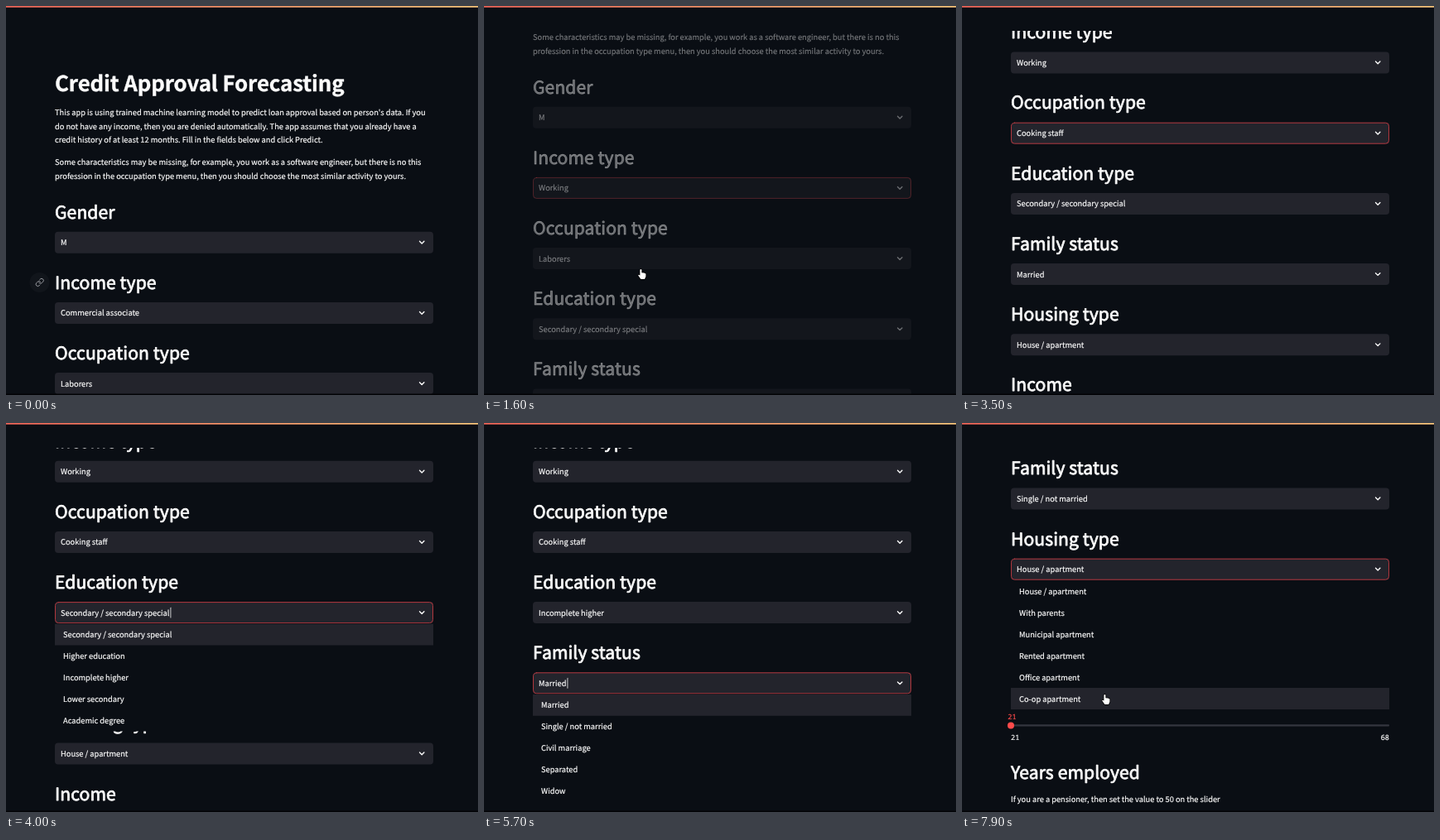
Write an HTML page with a canvas that moves like this. It is 570x470 px and loops after 8 s.

```html
<!DOCTYPE html>
<html lang="en">
<head>
<meta charset="utf-8">
<title>Credit Approval Forecasting</title>
<style>
html, body { margin: 0; width: 570px; height: 470px; overflow: hidden; background: #0a0e14; }
canvas { display: block; }
</style>
</head>
<body>
<canvas width="570" height="470"></canvas>
<script>
const ctx = document.querySelector('canvas').getContext('2d');
const LOOP = 8000, BG = '#0a0e14', BOX = '#23242c', INK = '#fafafa', RED = '#ff4b4b';
const SANS = '"Noto Sans CJK JP", "Noto Sans CJK SC", "Noto Sans CJK KR", "Noto Sans CJK TC", "Noto Sans CJK", "Source Sans Pro", sans-serif';
const MONO = '"Noto Sans Mono", "DejaVu Sans Mono", monospace';
const BODY = `9.29px ${SANS}`, HEAD = `21.1px ${SANS}`, TITLE = `bold 25.8px ${SANS}`, TICK = `8.6px ${MONO}`;
const LEFT = 59, RIGHT = 516, ROW = 26, LIST_MAX = 194.7;

const intro = [
  [131.9, 'This app is using trained machine learning model to predict loan approval based on person\'s data. If you'],
  [148.5, 'do not have any income, then you are denied automatically. The app assumes that you already have a'],
  [165.1, 'credit history of at least 12 months. Fill in the fields below and click Predict.'],
  [192.3, 'Some characteristics may be missing, for example, you work as a software engineer, but there is no this'],
  [208.9, 'profession in the occupation type menu, then you should choose the most similar activity to yours.']
];

// hand: [time, x, y] while the menu is in use
const fields = [
  { label: 'Gender', options: ['M', 'F'] },
  { label: 'Income type', pick: 3, open: 600, close: 1400,
    options: ['Commercial associate', 'State servant', 'Pensioner', 'Working', 'Student'],
    hand: [[800, 200, 250], [1300, 191, 324]] },
  { label: 'Occupation type', pick: 9, open: 2000, close: 2850, up: true,
    options: ['Laborers', 'Core staff', 'Sales staff', 'Security staff', 'Managers', 'Drivers',
      'High skill tech staff', 'Medicine staff', 'Accountants', 'Cooking staff', 'Cleaning staff',
      'Private service staff', 'Low-skill laborers', 'Secretaries', 'Waiters / barmen staff',
      'Realty agents', 'HR staff', 'IT staff'],
    hand: [[2150, 160, 200], [2550, 169, 261], [2640, 169, 261], [2780, 169, 238]] },
  { label: 'Education type', pick: 2, open: 3800, close: 4450,
    options: ['Secondary / secondary special', 'Higher education', 'Incomplete higher', 'Lower secondary', 'Academic degree'],
    hand: [[4120, 150, 255], [4400, 160, 308]] },
  { label: 'Family status', pick: 1, open: 5500, close: 6050,
    options: ['Married', 'Single / not married', 'Civil marriage', 'Separated', 'Widow'],
    hand: [[5820, 150, 341], [6000, 155, 367]] },
  { label: 'Housing type', pick: 5, open: 7350, close: 9000,
    options: ['House / apartment', 'With parents', 'Municipal apartment', 'Rented apartment', 'Office apartment', 'Co-op apartment'],
    hand: [[7500, 170, 203], [7850, 174, 334]] }
];
fields.forEach((f, i) => f.mid = 285.7 + 85.2 * i);

const ramp = (t, a, b) => Math.min(1, Math.max(0, (t - a) / (b - a)));
const ease = p => p < .5 ? 4 * p ** 3 : 1 - 4 * (1 - p) ** 3;
const scrollAt = t => 151 * ease(ramp(t, 150, 550)) + 161.2 * ease(ramp(t, 3200, 3600)) + 222.8 * ease(ramp(t, 6600, 7100));
const isOpen = (f, t) => t >= f.open && t < f.close;
const dimAt = t => Math.max(...fields.filter(f => f.hand).map(f =>
  ramp(t, f.close + 50, f.close + 150) - ramp(t, f.close + 270, f.close + 370)));

function along(keys, t) {
  let i = 0;
  while (i < keys.length - 2 && t > keys[i + 1][0]) i++;
  const [a, b] = [keys[i], keys[i + 1]], p = ramp(t, a[0], b[0]);
  return [a[1] + (b[1] - a[1]) * p, a[2] + (b[2] - a[2]) * p];
}

// bold: width of an outline that thickens the letters
function text(s, x, y, { font = BODY, color = INK, align = 'left', bold = .2, spacing = 0 } = {}) {
  ctx.font = font;
  ctx.letterSpacing = spacing + 'px';
  ctx.fillStyle = ctx.strokeStyle = color;
  ctx.textAlign = align;
  ctx.lineWidth = bold;
  ctx.fillText(s, x, y);
  ctx.strokeText(s, x, y);
}

const heading = (s, mid) => text(s, LEFT, mid + 7.8, { font: HEAD, bold: .8, spacing: .08 });

function rect(x, y, w, h, color, r = 0) {
  ctx.fillStyle = color;
  ctx.beginPath();
  ctx.roundRect(x, y, w, h, r);
  ctx.fill();
}

function line(color, width, ...points) {
  ctx.strokeStyle = color;
  ctx.lineWidth = width;
  ctx.beginPath();
  points.forEach(p => ctx.lineTo(...p));
  ctx.stroke();
}

function select(f, t, focused) {
  const { mid } = f, value = f.options[t >= f.close ? f.pick : 0];
  rect(LEFT, mid - 13, RIGHT - LEFT, 26, BOX, 4);
  if (focused) {
    ctx.strokeStyle = '#b0363d';
    ctx.lineWidth = 1;
    ctx.beginPath();
    ctx.roundRect(LEFT + .5, mid - 12.5, RIGHT - LEFT - 1, 25, 4);
    ctx.stroke();
  }
  text(value, 66, mid + 3.5);
  line(INK, 1.4, [499.5, mid - 1.4], [502.2, mid + 1.3], [504.9, mid - 1.4]);
  if (isOpen(f, t) && (t - f.open) % 1000 < 500) {
    const x = 67.5 + ctx.measureText(value).width;
    line(INK, .8, [x, mid - 6], [x, mid + 6]);
  }
}

function menu(f, t, scroll) {
  const full = f.options.length * ROW, h = Math.min(full, LIST_MAX), long = full > h;
  const top = f.up ? f.mid - 13 - h : f.mid + 13.4, w = long ? 452.5 : RIGHT - LEFT;
  const offset = long ? 109.4 * ease(ramp(t, 2200, 2550)) : 0;
  const handY = along(f.hand, t)[1] + scroll;
  const hover = t < f.hand[0][0] ? 0 : Math.floor((handY - top + offset) / ROW);
  ctx.save();
  rect(LEFT - 1, top, RIGHT - LEFT + 2, h, BG);
  ctx.clip();
  f.options.forEach((s, i) => {
    const y = top + i * ROW - offset;
    if (i === hover) rect(LEFT, y, w, ROW, BOX);
    text(s, 69, y + 16.5);
  });
  if (long) rect(511.5, top + offset * h / full, 4, h * h / full, '#6b6c73', 1);
  ctx.restore();
}

const chain = new Path2D('M10 13a5 5 0 0 0 7.54.54l3-3a5 5 0 0 0-7.07-7.07l-1.72 1.71M14 11a5 5 0 0 0-7.54-.54l-3 3a5 5 0 0 0 7.07 7.07l1.71-1.71');
function anchor(y) {
  rect(28.5, y - 12, 24, 24, '#11151b', 12);
  ctx.save();
  ctx.translate(40.7 - 5.5, y - 5.5);
  ctx.scale(.46, .46);
  ctx.strokeStyle = '#a3a5aa';
  ctx.lineWidth = 2;
  ctx.stroke(chain);
  ctx.restore();
}

const handShape = new Path2D('M-2.6-5.5q1-1 2 0V-1.8q3.5 0 5 1.2V3L3 6H-1.6L-4.8 1.6q0-1.6 2.2-.2Z');
function hand(x, y) {
  ctx.save();
  ctx.translate(x, y);
  ctx.strokeStyle = '#000';
  ctx.lineWidth = 1.4;
  ctx.stroke(handShape);
  ctx.fillStyle = '#fff';
  ctx.fill(handShape);
  ctx.restore();
}

function lowerForm() {
  heading('Income', 759.9);
  text('Your annual income in USD', LEFT, 793);
  rect(LEFT, 805, RIGHT - LEFT, 26, BOX, 4);
  text('0', 66, 821.5);
  line(INK, 1.2, [475, 818], [481, 818]);
  line(INK, 1.2, [499, 818], [505, 818]);
  line(INK, 1.2, [502, 815], [502, 821]);
  heading('Age', 866);
  rect(LEFT, 899.2, RIGHT - LEFT, 2.4, '#34363f', 1);
  rect(LEFT - 4, 896.4, 8, 8, RED, 4);
  text('21', 60.5, 893, { font: TICK, color: RED, align: 'center' });
  text('21', LEFT, 918.3, { font: TICK });
  text('68', RIGHT, 918.3, { font: TICK, align: 'right' });
  heading('Years employed', 957.5);
  text('If you are a pensioner, then set the value to 50 on the slider', LEFT, 993.3);
}

function draw(t) {
  const scroll = scrollAt(t);
  const focus = fields.findLast(f => t >= f.open);
  rect(0, 0, 570, 470, BG);
  ctx.save();
  ctx.translate(0, -scroll);
  ctx.globalAlpha = 1 - .62 * dimAt(t);
  text('Credit Approval Forecasting', LEFT, 102.6, { font: TITLE, bold: .4, spacing: -.1 });
  intro.forEach(([y, s]) => text(s, LEFT, y));
  fields.forEach(f => {
    heading(f.label, f.mid - 37);
    select(f, t, f === focus);
  });
  lowerForm();
  if (t < 200) anchor(fields[1].mid - 37);
  if (t >= 6300 && t < 7000) anchor(fields[5].mid - 37);
  if (focus && isOpen(focus, t)) menu(focus, t, scroll);
  ctx.restore();

  rect(0, 0, 570, 30, BG);
  const bar = ctx.createLinearGradient(0, 0, 570, 0);
  bar.addColorStop(0, '#ee6458');
  bar.addColorStop(1, '#f6c47a');
  rect(0, 0, 570, 1.7, bar);
  rect(0, 468.6, 570, 1.4, '#020305');
  if (focus && t >= focus.hand[0][0] && t < focus.close + 350) hand(...along(focus.hand, t));
}

ctx.textRendering = 'geometricPrecision';
ctx.lineJoin = ctx.lineCap = 'round';
const start = performance.now();
function tick() {
  draw((performance.now() - start) % LOOP);
  requestAnimationFrame(tick);
}
tick();
</script>
</body>
</html>
```
